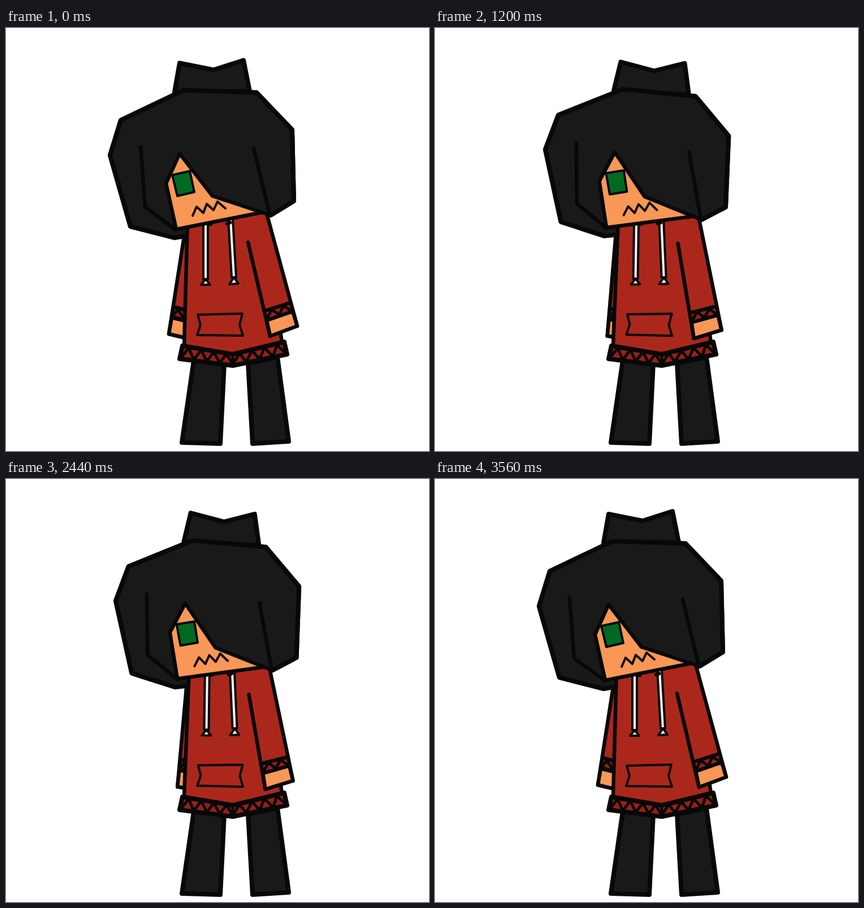
Write an HTML page that moves like this. It is 748 px wide and 748 px high and loops after 3.6 s.

```html
<!DOCTYPE html>
<html lang="en">
<head>
<meta charset="utf-8">
<title>Swaying figure</title>
<style>
  html, body { margin: 0; width: 100%; height: 100%; overflow: hidden; background: #fff; }
  svg { display: block; width: 100vw; height: 100vh; }
  svg * { stroke-linejoin: round; stroke-linecap: round; }
  .ink { stroke: #080808; stroke-width: 8; fill: none; }
  .hair { fill: #191919; }
  .red { fill: #ab271c; }
  .trim { fill: #981f17; }
  .skin { fill: #f99757; }
  .eye { fill: #006a22; }
  .white { fill: #f8f5f8; }
  .mid { stroke-width: 6.5; }
  .zig { stroke-width: 5; }
  .thin { stroke-width: 4; }
</style>
</head>
<body>
<svg viewBox="0 0 748 748">
  <g id="leftArm">
    <polygon class="ink red mid" points="321,330 288,541 330,551 350,330"/>
    <polygon class="ink trim mid" points="296,493 293,511 330,520 330,502"/>
    <polygon class="ink skin mid" points="293,512 288,541 330,551 330,521"/>
    <path class="ink zig" d="M295 509L304 498L314 513L322 502"/>
  </g>

  <g id="backHair">
    <polygon class="ink hair" points="298,113 307,62 367,74 420,57 431,112"/>
    <polygon class="ink hair" points="314,110 443,114 506,180 509,306 468,331 340,335 340,364 298,371 220,351 184,225 203,163"/>
  </g>

  <g>
    <polygon class="ink hair" points="332,588 386,593 379,735 311,733"/>
    <polygon class="ink hair" points="428,593 480,582 500,731 436,735"/>
  </g>

  <g id="torso">
    <polygon class="red" points="321,330 455,325 488,560 401,580 315,564"/>
    <path class="ink mid" d="M321 340L315 562M456 335L488 556"/>
    <polygon class="ink thin" points="339,507 418,505 413,525 419,544 338,543 344,525"/>
    <polygon class="ink white thin" points="349,340 357,340 357,444 349,444"/>
    <polygon class="ink white thin" points="393,338 401,338 407,441 399,441"/>
    <polygon class="ink white thin" points="353,444 345,454 361,454"/>
    <polygon class="ink white thin" points="403,441 395,453 411,452"/>
    <path class="ink mid" d="M358 347L362 347M391 346L396 344"/>
  </g>

  <polygon class="ink trim" points="312,562 401,577 492,555 497,577 401,597 307,585"/>
  <path id="hem" class="ink zig"/>

  <g id="rightArm">
    <polygon class="red" points="428,379 440,325 461,328 506,502 462,518"/>
    <polygon class="trim" points="458,500 502,486 507,500 461,516"/>
    <polygon class="ink skin mid" points="461,517 507,501 515,527 467,545"/>
    <path class="ink mid" d="M428 379L467 545M461 328L515 527M458 500L502 486"/>
    <path id="cuff" class="ink zig"/>
  </g>

  <g id="head">
    <polygon class="skin" points="307,222 283,275 301,356 453,326 365,297"/>
    <polygon class="ink eye thin" points="294,260 325,253 333,290 303,297"/>
    <polyline class="ink thin" points="330,332 337,316 349,327 355,311 367,322 374,307 388,319"/>
    <polygon class="hair" points="314,110 443,114 506,180 509,306 468,331 365,297 307,222 283,275 301,356 298,371 220,351 184,225 203,163"/>
    <path class="ink" d="M298 371L220 351L184 225L203 163L314 110L443 114L506 180L509 306L468 331"/>
    <path class="ink mid" d="M468 331L365 297L307 222L283 275L301 356L453 326"/>
    <path class="ink mid" d="M238 210L246 317L301 357M438 213L466 328"/>
  </g>
</svg>
<script>
  const LOOP = 3600, STEP = 40, TURN = 1780;
  const el = id => document.getElementById(id);

  // Joint angle at full sway (degrees) and pivot
  const joints = [
    ["leftArm", -6.1, 345, 310],
    ["backHair", 5.6, 348, 387],
    ["torso", 1.2, 400, 560],
    ["rightArm", 5.5, 400, 404],
    ["head", 5.6, 348, 387]
  ].map(([id, deg, x, y]) => ({ node: el(id), deg, x, y }));

  // Zigzag between a lower edge a-b and an upper edge c-d
  function zigzag(a, b, c, d, n) {
    let path = "";
    for (let i = 0; i <= n; i++) {
      const [p, q] = i % 2 ? [c, d] : [a, b];
      const at = k => (p[k] + (q[k] - p[k]) * i / n).toFixed(1);
      path += (i ? "L" : "M") + at(0) + " " + at(1);
    }
    return path;
  }

  el("hem").setAttribute("d",
    zigzag([309, 584], [401, 595], [312, 564], [401, 578], 8) +
    zigzag([401, 595], [496, 576], [402, 578], [490, 558], 8) +
    "M401 578V595");
  el("cuff").setAttribute("d",
    zigzag([462, 514], [505, 500], [459, 501], [501, 488], 4));

  function sway(t) {
    if (t <= TURN) return t / TURN;
    return Math.max(0, 2 - t / TURN) ** 1.05;
  }

  function draw(ms) {
    const p = sway(Math.floor(ms % LOOP / STEP) * STEP);
    for (const j of joints) {
      j.node.setAttribute("transform", `rotate(${j.deg * p} ${j.x} ${j.y})`);
    }
  }

  const start = performance.now();
  function tick() {
    draw(performance.now() - start);
    requestAnimationFrame(tick);
  }
  tick();
</script>
</body>
</html>
```
